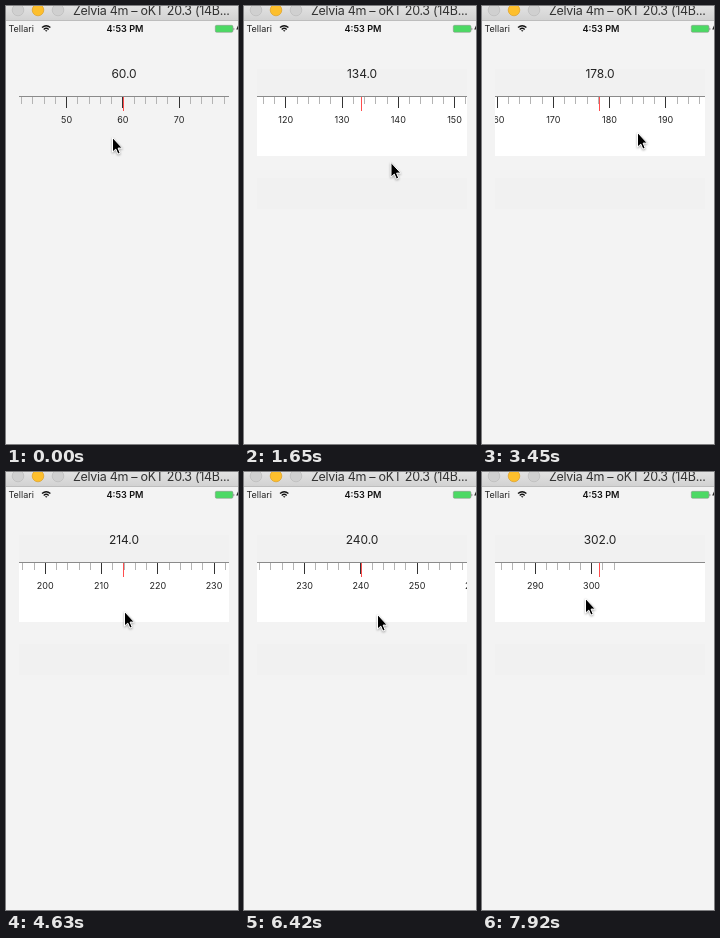
Write an HTML page that moves like this. It is 232 px wide and 438 px high and loops after 8 s.

```html
<!DOCTYPE html>
<html lang="en">
<head>
<meta charset="utf-8">
<title>Ruler picker</title>
<style>
  html, body { margin: 0; width: 100%; height: 100%; overflow: hidden; background: #f3f3f3; }
  svg { display: block; width: 232px; height: 438px; font-family: Inter, "Open Sans", sans-serif; }
  .crisp { shape-rendering: crispEdges; }
  .mid { text-anchor: middle; }
</style>
</head>
<body>
<svg viewBox="0 0 232 438">
  <defs>
    <linearGradient id="bar" x2="0" y2="1">
      <stop stop-color="#e2e2e2"/><stop offset="1" stop-color="#d2d2d2"/>
    </linearGradient>
    <clipPath id="view"><rect x="13" y="63" width="210" height="88"/></clipPath>
  </defs>

  <rect width="232" height="438" fill="#f3f3f3"/>

  <!-- window title -->
  <rect width="232" height="14" fill="url(#bar)"/>
  <rect class="crisp" y="14" width="232" height="1" fill="#bdbdbd"/>
  <g stroke-width=".7">
    <circle cx="12" cy="4" r="5.8" fill="#d0d0d0" stroke="#bbb"/>
    <circle cx="32" cy="4" r="5.8" fill="#fdbf2d" stroke="#dfa023"/>
    <circle cx="52" cy="4" r="5.8" fill="#d0d0d0" stroke="#bbb"/>
  </g>
  <text x="67" y="9" font-size="12.5" letter-spacing="-.3" fill="#333">Zelvia 4m – oKT 20.3 (14B...</text>

  <!-- status bar -->
  <text x="2.5" y="26" font-size="9" fill="#222">Tellari</text>
  <g fill="none" stroke="#111" stroke-width="1.3">
    <path d="M36 21.6Q40.2 17.8 44.4 21.6M37.7 23.4Q40.2 21.2 42.7 23.4"/>
    <path d="M38.9 24.3h2.6L40.2 25.8z" fill="#111" stroke="none"/>
  </g>
  <text class="mid" x="119" y="26" font-size="9.1" font-weight="600" fill="#111">4:53 PM</text>
  <rect x="209.3" y="19.3" width="17.6" height="7" rx="1.3" fill="#4cd964" stroke="#888" stroke-width=".5"/>
  <path d="M227.7 21.5q1.4 1.5 0 3z" fill="#333"/>
  <path d="M232 19.5l-1.8 4h1.8z" fill="#222"/>

  <!-- picker -->
  <g id="panel" class="crisp">
    <rect x="13" y="63" width="210" height="27" fill="#f1f1f1"/>
    <rect x="13" y="91" width="210" height="59" fill="#fff"/>
  </g>
  <rect id="lower" class="crisp" x="13" y="172" width="210" height="31" fill="#f1f1f1"/>
  <text id="value" class="mid" x="118" y="72" font-size="12" letter-spacing="-.1" fill="#222"></text>
  <rect class="crisp" x="13" y="90" width="210" height="1" fill="#8a8a8a"/>
  <g clip-path="url(#view)"><g id="scale"></g></g>
  <rect class="crisp" x="117" y="91" width="1" height="14" fill="#ff4d4d"/>

  <path id="cursor" d="M0 0V14.6L3.3 11.6L5.4 16.6L7.7 15.6L5.6 10.6H9.8Z" stroke="#fff"
    style="filter:drop-shadow(0 1px 1px rgba(0,0,0,.35))"/>
</svg>
<script>
const LOOP = 8000, STEP = 150, UNIT = 5.625, CENTER = 118, MAX = 304;
const $ = id => document.getElementById(id);

// Resting poses: time, ruler value, pointer x, pointer y
const poses = [
  [0, 60.2, 106, 131],
  [900, 93.2, 133, 129],
  [2400, 173.9, 160, 183],
  [3450, 178.3, 155, 126],
  [4630, 214, 118, 139],
  [6420, 240.2, 133, 142],
  [6720, 240.2, 133, 142],
  [7920, 301.5, 103, 126]
];

let marks = "";
for (let v = 0; v <= MAX; v += 2) {
  const x = v * UNIT, major = v % 10 === 0;
  marks += `<rect class="crisp" x="${x - .5}" y="91" width="1" height="${major ? 11 : 7}" fill="${major ? "#333" : "#b4b4b4"}"/>`;
  if (major) marks += `<text class="mid" x="${x}" y="117" font-size="9" fill="#222">${v}</text>`;
}
$("scale").innerHTML = marks;

// Between poses the pointer swipes left and back while the ruler speeds up and slows down.
function pose(t) {
  const i = poses.findLastIndex(k => k[0] <= t);
  const a = poses[i], b = poses[i + 1] || a;
  const span = b[0] - a[0] || LOOP;
  const p = Math.floor((t - a[0]) / STEP) * STEP / span;
  const swipes = Math.ceil((b[1] - a[1]) / 40);
  const turn = 2 * Math.PI * swipes * p;
  const glide = swipes ? p - Math.sin(turn) / (2 * Math.PI * swipes) : p;
  const [, v, x, y] = a.map((n, j) => n + (b[j] - n) * (j === 1 ? glide : p));
  return { v, x: x - 40 * Math.sin(turn), y };
}

function draw() {
  const t = performance.now() % LOOP;
  const { v, x, y } = pose(t);
  $("panel").style.display = t < 150 ? "none" : "";
  $("lower").style.display = t < 1200 ? "none" : "";
  $("value").textContent = (Math.round(v / 2) * 2).toFixed(1);
  $("scale").setAttribute("transform", `translate(${CENTER - v * UNIT} 0)`);
  $("cursor").setAttribute("transform", `translate(${x + .5} ${y + .5})`);
  requestAnimationFrame(draw);
}
draw();
</script>
</body>
</html>
```
